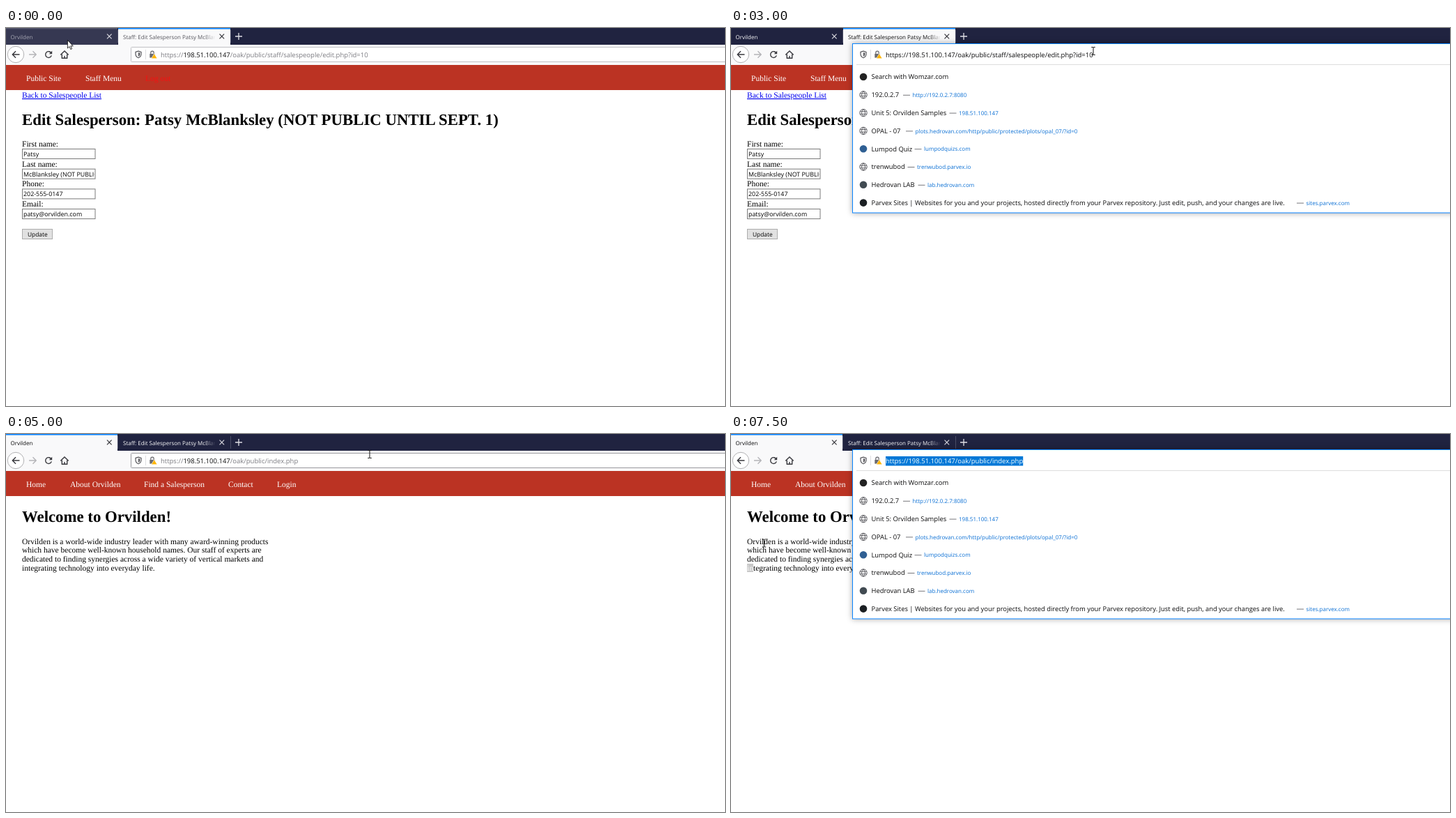
Animation of 1032 by 542 pixels, one loop 8 s. Source, as an HTML page:

```html
<!DOCTYPE html>
<html lang="en">
<head>
<meta charset="utf-8">
<title>Browser session</title>
<style>
html, body { margin: 0; width: 100%; height: 100%; overflow: hidden; background: #fff; }
svg { display: block; text-rendering: geometricPrecision; }
text { white-space: pre; }
.ui { font-family: "Open Sans", "Noto Sans", sans-serif; }
.page { font-family: "Liberation Serif", "Times New Roman", serif; font-size: 11.5px; }
.page .head { font-size: 22.8px; font-weight: bold; }
.line { fill: none; stroke: #38383d; stroke-width: 1.4; }
.panel { fill: #fff; stroke: #0a84ff; filter: drop-shadow(0 0 4px rgba(0,0,0,.35)); }
</style>
</head>
<body>
<svg id="stage" width="1032" height="542" viewBox="0 0 1032 542"></svg>
<script>
const stage = document.getElementById('stage');
const STEP = 500;
const BRAND = 'Orvilden';
const PERSON = 'Patsy McBlanksley';
const HOST = '198.51.100.147';
const SELECTED = '#0078d7';

// Pointer per step: kind, x, y
const pointer = [
  ['arrow', 88, 17], ['arrow', 182, 148], ['arrow', 309, 223], ['beam', 494, 35],
  ['beam', 529, 41], ['beam', 534, 37], ['beam', 520, 33], ['arrow', 513, 307],
  ['arrow', 80, 14], ['arrow', 300, 164], ['beam', 522, 29], ['arrow', 354, 97],
  ['arrow', 146, 97], ['arrow', 191, 59], ['arrow', 241, 53], ['beam', 47.5, 156.5]
];

// Suggestions: icon colour (empty for a globe), title, address x, address
const suggestions = [
  ['#222', 'Search with Womzar.com'],
  ['', '192.0.2.7', 260.5, 'http://192.0.2.7:8080'],
  ['', `Unit 5: ${BRAND} Samples`, 327, HOST],
  ['', 'OPAL - 07', 264.5, 'plots.hedrovan.com/http/public/protected/plots/opal_07/?id=0'],
  ['#2f5f93', 'Lumpod Quiz', 277, 'lumpodquizs.com'],
  ['', 'trenwubod', 267, 'trenwubod.parvex.io'],
  ['#414b52', 'Hedrovan LAB', 282, 'lab.hedrovan.com'],
  ['#1b1f23', 'Parvex Sites | Websites for you and your projects, hosted directly from your Parvex repository. Just edit, push, and your changes are live.', 825.5, 'sites.parvex.com']
];

const text = (x, y, s, fill = '#000', extra = '') =>
  `<text x="${x}" y="${y}" fill="${fill}" ${extra}>${s}</text>`;
const size = px => `font-size="${px}"`;
const rect = (x, y, w, h, fill, extra = '') =>
  `<rect x="${x}" y="${y}" width="${w}" height="${h}" fill="${fill}" ${extra}/>`;
const line = (d, extra = '') => `<path class="line" d="${d}" ${extra}/>`;
const stroke = (color, width = 1.4) => `style="stroke:${color};stroke-width:${width}"`;
const nav = items => rect(0, 53, 1032, 36, '#bb3323') +
  items.map(([x, s, fill = '#fff']) => text(x, 76, s, fill)).join('');

function field(i, label, value) {
  const y = 173 + i * 28.7;
  return text(23, y - 3, label) +
    rect(23.5, y + .5, 104.5, 14, '#fff', 'stroke="#7a7a7a"') +
    `<svg class="ui" x="23" y="${y}" width="104" height="15">${text(2, 11, value, '#000', size(8.9))}</svg>`;
}

function editPage() {
  return nav([[29, 'Public Site'], [114, 'Staff Menu'], [200, 'Log out', '#f51212']]) +
    text(23, 100, 'Back to Salespeople List', '#00e', 'text-decoration="underline"') +
    text(23, 139, `Edit Salesperson: ${PERSON} (NOT PUBLIC UNTIL SEPT. 1)`, '#000', 'class="head"') +
    field(0, 'First name:', 'Patsy') +
    field(1, 'Last name:', 'McBlanksley (NOT PUBLIC UNTIL') +
    field(2, 'Phone:', '202-555-0147') +
    field(3, 'Email:', 'patsy@orvilden.com') +
    rect(23.5, 288.5, 43, 14, '#e1e1e1', 'stroke="#adadad"') +
    text(31, 299, 'Update', '#000', `class="ui" ${size(8.4)}`);
}

function homePage(mark) {
  return nav([[29, 'Home'], [92, `About ${BRAND}`], [198, 'Find a Salesperson'], [319, 'Contact'], [389, 'Login']]) +
    text(23, 126, `Welcome to ${BRAND}!`, '#000', 'class="head"') +
    text(23, 157.5, `${BRAND} is a world-wide industry leader with many award-winning products`) +
    text(23, 170.3, 'which have become well-known household names. Our staff of experts are') +
    text(23, 183.1, 'dedicated to finding synergies across a wide variety of vertical markets and') +
    (mark ? rect(23, 186, 9, 12, mark) : '') +
    text(23, 196, `<tspan fill="${mark ? '#fff' : '#000'}">in</tspan>tegrating technology into everyday life.`);
}

function tabs(home, hover, bright) {
  const ink = active => active ? (bright ? '#0c0c0d' : '#55555c') : (bright ? '#f9f9fa' : '#a5a6b2');
  const icon = active => active ? '#38383d' : '#d5d5dc';
  const cross = (x, color) => line(`M${x - 3.3} 8.7l6.6 6.6m0 -6.6l-6.6 6.6`, stroke(color, 1.2));
  const x = home ? 0 : 161;
  return `<linearGradient id="fade" gradientUnits="userSpaceOnUse" x1="284" x2="301" y1="0" y2="0">
      <stop stop-color="${ink(!home)}"/><stop offset="1" stop-color="${ink(!home)}" stop-opacity="0"/></linearGradient>` +
    rect(0, 0, 1032, 24, '#202340') +
    (hover ? rect(0, 0, 160, 24, '#363852') + rect(0, 0, 160, 1.5, '#54566d') : '') +
    rect(160, 3, 1, 18, '#4b4d66') + rect(322, 3, 1, 18, '#4b4d66') +
    rect(x, 0, home ? 160 : 161, 24, '#f9f9fa') + rect(x, 0, home ? 160 : 161, 1.6, '#0a84ff') +
    text(6.5, 16, BRAND, ink(home), size(8)) +
    text(168, 16, `Staff: Edit Salesperson ${PERSON}`, 'url(#fade)', size(8)) +
    cross(148.3, icon(home)) + cross(309.8, icon(!home)) +
    line('M329 12h10M334 7v10', stroke('#e0e0e6', 1.3));
}

function toolbar(hover) {
  return rect(0, 24, 1032, 29, '#f9f9fa') +
    '<circle cx="14" cy="38" r="11.7" fill="#fff" stroke="#b1b1b3"/>' +
    line('M19.5 38H9.5M14 33.3L9.3 38l4.7 4.7') +
    line('M33 38h10M38.5 33.3L43.2 38l-4.7 4.7', stroke('#b4b4b8')) +
    line('M65 36a4.4 4.4 0 1 0 .3 3.4') + '<path d="M66.2 32.8v4.4h-4.4z" fill="#38383d"/>' +
    line('M78.3 38.6L84 33l5.7 5.6M80.3 37.8v5.4h7.4v-5.4M84 43v-3') +
    rect(179.5, 27.5, 900, 21, '#fff', `stroke="${hover ? '#9a9a9e' : '#c0c0c4'}" rx="1"`);
}

function address(path, open, selected) {
  const dim = open ? '#0c0c0d' : '#7c7c82';
  const ink = s => selected ? '#fff' : s;
  return line('M186 34.4l4-1.2 4 1.2v2.8q0 4-4 5.6q-4-1.6-4-5.6z', stroke('#55555a', 1.2)) +
    '<path d="M190 35l2.3.7v2q0 2.2-2.3 3.4z" fill="#55555a"/>' +
    rect(200, 31, 1, 14, '#dedee0') +
    rect(206.3, 37, 7.4, 5.6, '#6b6b70') +
    line('M207.8 37v-1.6a2.2 2.2 0 0 1 4.4 0V37', stroke('#6b6b70', 1.2)) +
    '<path d="M212.8 36.8l4.2 7h-8.4z" fill="#ffb400" stroke="#fff" stroke-width=".6"/>' +
    (selected ? rect(222, 32, 0, 13.5, SELECTED, 'id="highlight"') : '') +
    text(222, 42, `https://<tspan fill="${ink('#0c0c0d')}">${HOST}</tspan>${path}`, ink(dim), `id="address" ${size(9.5)}`);
}

function suggestion([color, title, x, url], i) {
  const y = 70 + i * 25.8;
  const globe = `<g transform="translate(190 ${y})">` +
    line('M-5.2 0a5.2 5.2 0 1 0 10.4 0a5.2 5.2 0 1 0 -10.4 0M0 -5.2q-5 5.2 0 10.4q5 -5.2 0 -10.4M-4.7 -1.8h9.4M-4.7 1.8h9.4', stroke('#606065', 1)) + '</g>';
  return (color ? `<circle cx="190" cy="${y}" r="5.3" fill="${color}"/>` : globe) +
    text(201.5, y + 3.3, title, '#0c0c0d', size(9.4)) +
    (url ? rect(x - 13.5, y, 10, 1, '#77777c') + text(x, y + 3.2, url, '#0a6fd4', size(8)) : '');
}

function dropdown(row) {
  return '<rect class="panel" x="174.5" y="22.5" width="900" height="242.5"/>' +
    rect(180, 52, 852, 1, '#dedede') +
    (row ? rect(175, 58.5 + row * 25.8, 857, 21.5, '#ededed') : '') +
    suggestions.map(suggestion).join('');
}

function cursor([kind, x, y]) {
  const shape = kind === 'arrow'
    ? '<path d="M.4 .4v11.6l2.6-2.4 1.8 4 1.8-.8-1.8-3.9h3.5z" fill="#fff" stroke="#000" stroke-width=".8"/>'
    : line('M-2.7 -5.5h2L0 -5l.7-.5h2M0 -5V5M-2.7 5.5h2L0 5l.7.5h2', stroke('#111', 1));
  return `<g transform="translate(${x} ${y})">${shape}</g>`;
}

function draw(i) {
  const home = i > 8;
  const open = [6, 7, 11, 14, 15].includes(i);
  const selected = open && i > 6;
  const mark = i > 13 ? '#c8c8c8' : i > 11 ? SELECTED : '';
  const path = '/oak/public/' + (home ? 'index.php' : 'staff/salespeople/edit.php?id=10');
  stage.innerHTML =
    `<g class="page">${home ? homePage(mark) : editPage()}</g><g class="ui">` +
    tabs(home, i === 0 || i === 8, i > 5) +
    toolbar([3, 4, 5, 10].includes(i)) +
    (open ? dropdown(i === 11 ? 1 : 0) : '') +
    address(path, open, selected) + '</g>' + cursor(pointer[i]);
  if (selected) {
    const width = stage.querySelector('#address').getComputedTextLength();
    stage.querySelector('#highlight').setAttribute('width', width);
  }
}

let shown = -1;
function tick() {
  const i = Math.floor(performance.now() / STEP) % pointer.length;
  if (i !== shown) draw(shown = i);
  requestAnimationFrame(tick);
}
tick();
</script>
</body>
</html>
```
